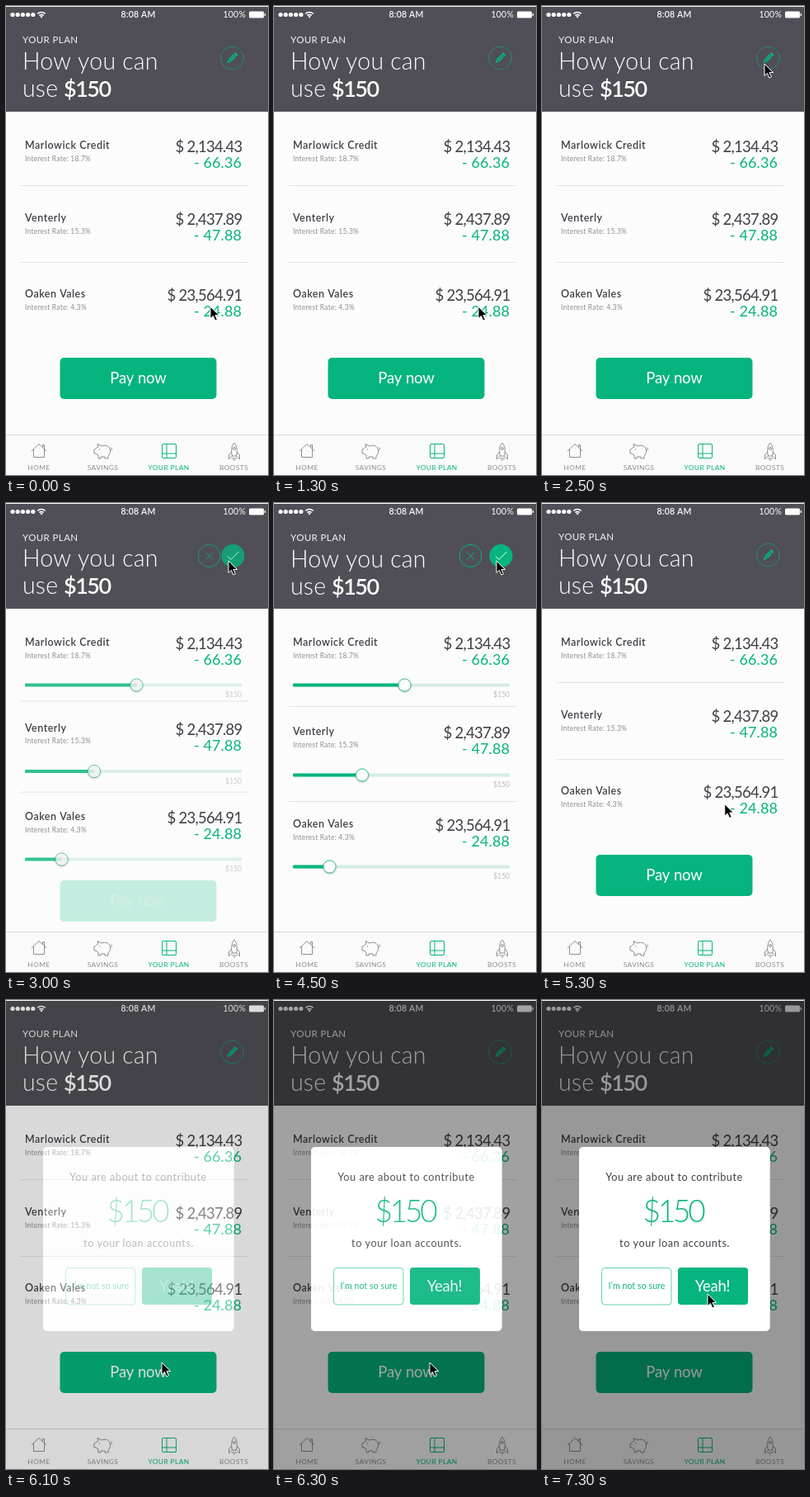
Recreate the animation shown at these times as an HTML page with a canvas. Size 318 by 568 pixels, loop 7.4 s.

```html
<!DOCTYPE html>
<html lang="en">
<head>
<meta charset="utf-8">
<title>Your plan</title>
<style>
html, body { margin: 0; width: 100%; height: 100%; overflow: hidden; background: #fcfcfc; }
canvas { display: block; width: 318px; height: 568px; }
</style>
</head>
<body>
<canvas id="stage"></canvas>
<script>
const W = 318, H = 568, LOOP = 7400;
const GREEN = '#05b47e', DARK = '#504e56', INK = '#403e46', GRAY = '#8e8e90';
const FONT = 'Lato, "Open Sans", sans-serif';
const CARD = [45, 178, 231.5, 223, 5];
const canvas = document.getElementById('stage');
const ctx = canvas.getContext('2d');
const dpr = window.devicePixelRatio || 1;
canvas.width = W * dpr;
canvas.height = H * dpr;

const rows = [
  { name: 'Marlowick Credit', rate: '18.7%', due: '$ 2,134.43', pay: '- 66.36', y: 173, shift: 0, knob: 158.5, line: 217, lineTo: 246, track: 220.5 },
  { name: 'Venterly', rate: '15.3%', due: '$ 2,437.89', pay: '- 47.88', y: 261, shift: 20, knob: 107, line: 310, lineTo: 361, track: 329.5 },
  { name: 'Oaken Vales', rate: '4.3%', due: '$ 23,564.91', pay: '- 24.88', y: 353, shift: 40, knob: 67.5, track: 440.5 }
];

const mix = (a, b, p) => a + (b - a) * p;
function ease(t, from, to) {
  const p = Math.min(1, Math.max(0, (t - from) / (to - from)));
  return p * p * (3 - 2 * p);
}

function text(s, x, y, size, color, { weight = 400, align = 'left', gap = 0 } = {}) {
  ctx.font = `${weight} ${size}px ${FONT}`;
  ctx.letterSpacing = gap + 'px';
  ctx.textAlign = align;
  ctx.fillStyle = color;
  ctx.fillText(s, x, y);
}

function paint(fill, stroke, width = 1) {
  if (fill) { ctx.fillStyle = fill; ctx.fill(); }
  if (stroke) { ctx.strokeStyle = stroke; ctx.lineWidth = width; ctx.stroke(); }
}

function box(x, y, w, h, r, fill, stroke) {
  ctx.beginPath();
  ctx.roundRect(x, y, w, h, r);
  paint(fill, stroke);
}

function disc(x, y, r, fill, stroke) {
  ctx.beginPath();
  ctx.arc(x, y, r, 0, Math.PI * 2);
  paint(fill, stroke);
}

function layer(alpha, draw) {
  if (alpha <= 0) return;
  ctx.save();
  ctx.globalAlpha *= alpha;
  draw();
  ctx.restore();
}

function shape(d, x, y, fill, stroke, width = 1) {
  layer(1, () => {
    ctx.translate(x, y);
    const path = new Path2D(d);
    if (fill) { ctx.fillStyle = fill; ctx.fill(path); }
    if (stroke) {
      ctx.strokeStyle = stroke;
      ctx.lineWidth = width;
      ctx.stroke(path);
    }
  });
}

function statusBar() {
  for (let i = 0; i < 5; i++) disc(8 + i * 6.2, 10.5, 2.6, '#fff');
  for (const r of [3.5, 6.5]) {
    ctx.beginPath();
    ctx.arc(43, 14, r, -Math.PI * 0.76, -Math.PI * 0.24);
    paint(null, '#fff', 1.6);
  }
  disc(43, 13, 1.3, '#fff');
  text('8:08 AM', 160.5, 14, 10.5, '#fff', { weight: 600, align: 'center', gap: 0.2 });
  text('100%', 291, 14, 10.5, '#fff', { align: 'right', gap: 0.2 });
  box(295, 6.5, 18, 8, 1.5, '#fff');
  box(313.6, 9, 1.4, 3, 0.5, '#fff');
}

function pencil() {
  layer(1, () => {
    ctx.setLineDash([1.6, 0.8]);
    disc(274.5, 63, 13.7, null, GREEN);
  });
  layer(1, () => {
    ctx.translate(274.5, 63);
    ctx.rotate(-Math.PI / 4);
    ctx.fillStyle = GREEN;
    ctx.fillRect(-4, -2.3, 8, 4.6);
    ctx.fillRect(4.8, -2.3, 2.8, 4.6);
    shape('M-8.4 0L-4.7 -2.3V2.3Z', 0, 0, GREEN);
    ctx.fillStyle = DARK;
    ctx.fillRect(-3, -0.35, 6.4, 0.7);
  });
}

function header(edit) {
  ctx.fillStyle = DARK;
  ctx.fillRect(0, 0, W, 128);
  statusBar();
  layer(1, () => {
    ctx.translate(0, edit);
    text('YOUR PLAN', 20, 45, 11.5, '#f4f4f5', { gap: 0.4 });
    text('How you can', 20, 76.5, 28.5, '#fff', { weight: 300, gap: 0.2 });
    text('use', 20, 109.5, 28.5, '#fff', { weight: 300, gap: 0.2 });
    text('$150', 70, 109.5, 27, '#fff', { weight: 600, gap: -1.5 });
  });
  layer(1 - edit, pencil);
  layer(edit, () => {
    const x = mix(275, 238.5, edit);
    disc(x, 64, 13.5, null, GREEN);
    shape('M-4.5 -4.5L4.5 4.5M4.5 -4.5L-4.5 4.5', x, 64, null, GREEN);
    disc(275.5, 64, 14, GREEN);
    shape('M-6.5 0.5L-2.5 4.5L7 -5', 275.5, 64, null, '#fff');
  });
}

function slider(row) {
  box(23, row.track - 2, 263, 4, 1, '#d5ece3');
  box(23, row.track - 2, row.knob - 23, 4, 1, GREEN);
  layer(1, () => {
    ctx.shadowColor = 'rgba(0,0,0,.3)';
    ctx.shadowBlur = 3 * dpr;
    ctx.shadowOffsetY = dpr;
    disc(row.knob, row.track, 7.6, '#fff');
  });
  disc(row.knob, row.track, 7.6, null, '#2bbd8f');
  text('$150', 286, row.track + 14.5, 8.5, '#b9b9bb', { align: 'right' });
}

function account(row, edit) {
  const y = row.y + row.shift * edit;
  text(row.name, 23, y, 12.5, INK, { weight: 600, gap: 0.5 });
  text('Interest Rate: ' + row.rate, 23, y + 14.5, 8.5, GRAY, { gap: 0.22 });
  text(row.due, 286.5, y + 4, 18.5, INK, { align: 'right', gap: -0.75 });
  text(row.pay, 286, y + 23, 18, GREEN, { align: 'right', gap: 0.1 });
  if (row.line) {
    ctx.fillStyle = '#e2e2e3';
    ctx.fillRect(18, mix(row.line, row.lineTo, edit), 276, 1);
  }
  layer(edit, () => {
    ctx.translate(0, (1 - edit) * -row.shift);
    slider(row);
  });
}

function tabs() {
  ctx.fillStyle = '#fafafa';
  ctx.fillRect(0, 519, W, 49);
  ctx.fillStyle = '#d9d9da';
  ctx.fillRect(0, 519, W, 1);
  ctx.lineJoin = 'round';
  shape('M-9 0L0 -8.5L9 0M-6.5 -2V7.5H6.5V-2M4.5 -4.5V-7.5H6.5V-2.5', 40, 539, null, GRAY);
  shape('M-11 -2C-9 -2 -9 -4 -6 -5L-7 -8.5L-2 -6C3 -8 8 -6 8.5 -1C9 3 7 5 6 6V9H2V7H-3V9H-6V5L-9 3H-11ZM8.5 -1C11 -1 11 -4 9.5 -4', 118, 539, null, GRAY);
  disc(113.5, 537, 0.7, GRAY);
  box(189.5, 530.5, 17, 17, 1.5, null, GREEN);
  shape('M-3 -8.5V8.5M-8.5 3H8.5', 198, 539, null, GREEN);
  shape('M0 -10C3.5 -6 4 0 2.5 6H-2.5C-4 0 -3.5 -6 0 -10ZM-3.3 1L-6.5 5V10L-2.5 6M3.3 1L6.5 5V10L2.5 6M-2 8V10M0 8V12M2 8V10', 277, 539, null, GRAY);
  disc(277, 536, 1.4, null, GRAY);
  [['HOME', 40], ['SAVINGS', 117.5], ['YOUR PLAN', 197.5], ['BOOSTS', 276.5]].forEach(([s, x], i) =>
    text(s, x, 562, 8.4, i === 2 ? GREEN : GRAY, { align: 'center', gap: 0.4 }));
}

function dialog() {
  box(...CARD, '#fff');
  text('You are about to contribute', 160.5, 219, 12.7, INK, { align: 'center', gap: 0.5 });
  text('$150', 159, 269, 37, GREEN, { weight: 300, align: 'center', gap: -3.2 });
  text('to your loan accounts.', 161, 299, 12.7, INK, { align: 'center', gap: 0.5 });
  box(72.5, 324.5, 84.5, 44.5, 4, null, '#62cfaa');
  text('I’m not so sure', 115, 350, 10.5, GREEN, { align: 'center', gap: 0.1 });
  box(165, 324, 85, 45, 4, GREEN);
  text('Yeah!', 207, 353, 18.5, '#fff', { align: 'center', gap: -0.3 });
}

// Shade everything around the dialog, which itself fades over the bright page.
function shade() {
  ctx.beginPath();
  ctx.rect(0, 0, W, H);
  ctx.roundRect(...CARD);
  ctx.fillStyle = '#000';
  ctx.fill('evenodd');
}

function pointer(t) {
  const up = ease(t, 1400, 2350);
  const down = ease(t, 4650, 5565);
  const last = ease(t, 6450, 7050);
  let x = mix(248, 270, up), y = mix(364, 70, up);
  x = mix(x, 189, Math.pow(down, 2.3));
  y = mix(y, 439, down);
  return [mix(x, 201, last), mix(y, 356, last)];
}

function draw(t) {
  const edit = ease(t, 2550, 3200) - ease(t, 4550, 5200);
  const open = ease(t, 5900, 6400);
  ctx.setTransform(dpr, 0, 0, dpr, 0, 0);
  ctx.fillStyle = '#fcfcfc';
  ctx.fillRect(0, 0, W, H);
  header(edit);
  rows.forEach(row => account(row, edit));
  layer(1 - edit, () => {
    ctx.translate(0, edit * 40);
    box(65.5, 426, 190, 50, 5, GREEN);
    text('Pay now', 160.5, 457, 18.5, '#fff', { align: 'center', gap: -0.1 });
  });
  tabs();
  layer(0.4 * open, shade);
  layer(open, dialog);
  ctx.fillStyle = '#fff';
  ctx.fillRect(0, 0, W, 1);
  const [x, y] = pointer(t);
  shape('M0 0V14.5L3.4 11.4L5.8 17L8.4 15.9L6 10.5H10.6Z', x, y, '#000', '#fff');
}

const start = performance.now();
function tick() {
  draw((performance.now() - start) % LOOP);
  requestAnimationFrame(tick);
}
tick();
</script>
</body>
</html>
```
